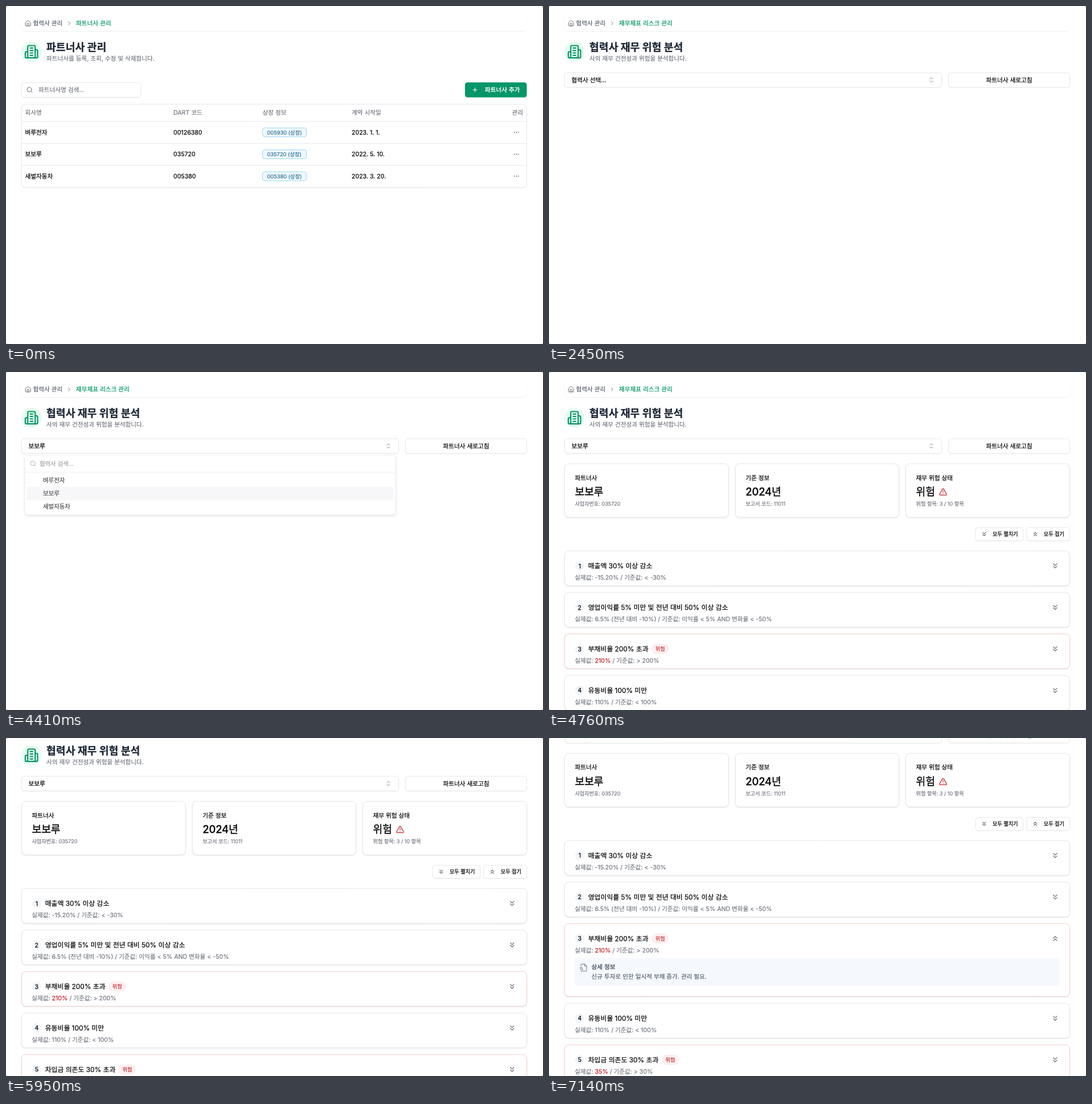
Recreate the animation shown at these times as an HTML page with a canvas. Size 943 px wide and 594 px high, loop 8.12 s.

```html
<!DOCTYPE html>
<html lang="ko">
<head>
<meta charset="utf-8">
<title>파트너사 관리</title>
<style>
html, body { margin: 0; width: 100%; height: 100%; overflow: hidden; background: #fff; }
canvas { display: block; width: 943px; height: 594px; }
</style>
</head>
<body>
<canvas id="stage"></canvas>
<script>
const W = 943, H = 594, LOOP = 8120, STEP = 70;
const canvas = document.getElementById('stage');
const ctx = canvas.getContext('2d');
const dpr = window.devicePixelRatio || 1;
canvas.width = W * dpr;
canvas.height = H * dpr;

const FAMILY = 'Inter, "Noto Sans CJK KR", "Noto Sans CJK", sans-serif';
const INK = '#0a0a0a', GRAY = '#696e77', GREEN = '#059669', RED = '#c5262b', LINE = '#e3e5e9';
const BODY = 10.6, SMALL = 9.1, HEAD = 11.85, TITLE = 18.3;

const COMPANIES = [
  { name: '벼루전자', code: '00126380', stock: '005930', since: '2023. 1. 1.' },
  { name: '보보루', code: '035720', stock: '035720', since: '2022. 5. 10.' },
  { name: '새벌자동차', code: '005380', stock: '005380', since: '2023. 3. 20.' }
];

// value is the measured part, red when the check fails
const CHECKS = [
  { title: '매출액 30% 이상 감소', value: '-15.20%', limit: '< -30%' },
  { title: '영업이익률 5% 미만 및 전년 대비 50% 이상 감소', value: '6.5% (전년 대비 -10%)', limit: '이익률 < 5% AND 변화율 < -50%' },
  { title: '부채비율 200% 초과', value: '210%', limit: '> 200%', risk: true },
  { title: '유동비율 100% 미만', value: '110%', limit: '< 100%' },
  { title: '차입금 의존도 30% 초과', value: '35%', limit: '> 30%', risk: true },
  { title: '이자보상배율 1 미만', value: '1.5', limit: '< 1' }
];

const ICONS = {
  home: ['M15 21v-8a1 1 0 0 0-1-1h-4a1 1 0 0 0-1 1v8', 'M3 10a2 2 0 0 1 .7-1.5l7-6a2 2 0 0 1 2.6 0l7 6A2 2 0 0 1 21 10v9a2 2 0 0 1-2 2H5a2 2 0 0 1-2-2z'],
  right: ['m9 18 6-6-6-6'],
  building: ['M6 22V4a2 2 0 0 1 2-2h8a2 2 0 0 1 2 2v18Z', 'M6 12H4a2 2 0 0 0-2 2v6a2 2 0 0 0 2 2h2', 'M18 9h2a2 2 0 0 1 2 2v9a2 2 0 0 1-2 2h-2', 'M10 6h4M10 10h4M10 14h4M10 18h4'],
  search: ['M19 11a8 8 0 1 1-16 0a8 8 0 1 1 16 0', 'm21 21-4.3-4.3'],
  plus: ['M5 12h14M12 5v14'],
  dots: ['M5 12h.01M12 12h.01M19 12h.01'],
  sort: ['m7 15 5 5 5-5', 'm7 9 5-5 5 5'],
  down: ['m7 6 5 5 5-5', 'm7 13 5 5 5-5'],
  up: ['m17 11-5-5-5 5', 'm17 18-5-5-5 5'],
  alert: ['m21.73 18-8-14a2 2 0 0 0-3.48 0l-8 14A2 2 0 0 0 4 21h16a2 2 0 0 0 1.73-3', 'M12 9v4M12 17h.01'],
  file: ['M14 2v4a2 2 0 0 0 2 2h4', 'M4.27 21a2 2 0 0 0 1.73 1H18a2 2 0 0 0 2-2V7l-5-5H6a2 2 0 0 0-2 2v3', 'm9 18-1.5-1.5', 'M8 14a3 3 0 1 1-6 0a3 3 0 1 1 6 0']
};
for (const key in ICONS) ICONS[key] = ICONS[key].map(d => new Path2D(d));

const ramp = (t, from, to) => Math.min(1, Math.max(0, (t - from) / (to - from)));
const easeOut = p => 1 - (1 - p) * (1 - p);

function group(alpha, dx, dy, draw) {
  if (alpha <= 0) return;
  ctx.save();
  ctx.globalAlpha *= alpha;
  ctx.translate(dx, dy);
  draw();
  ctx.restore();
}

// Text is placed by its vertical centre; returns its right edge.
function text(str, x, cy, color = INK, size = BODY, { bold = 0.14, weight = 400, align = 'left' } = {}) {
  ctx.font = `${weight} ${size}px ${FAMILY}`;
  ctx.textAlign = align;
  const y = cy + size * 0.37;
  ctx.fillStyle = ctx.strokeStyle = color;
  ctx.fillText(str, x, y);
  ctx.lineWidth = bold;
  ctx.lineJoin = 'round';
  ctx.strokeText(str, x, y);
  return x + ctx.measureText(str).width;
}
const MEDIUM = { bold: 0.25 };

function icon(name, cx, cy, size, color, weight = 2) {
  const k = size / 24;
  ctx.save();
  ctx.translate(cx - size / 2, cy - size / 2);
  ctx.scale(k, k);
  ctx.strokeStyle = color;
  ctx.lineWidth = weight;
  ctx.lineCap = ctx.lineJoin = 'round';
  for (const path of ICONS[name]) ctx.stroke(path);
  ctx.restore();
}

function box(x, y, right, bottom, r, fill, border, shadow = 0, blur = 2, drop = 1) {
  const shape = new Path2D();
  shape.roundRect(x, y, right - x, bottom - y, r);
  if (shadow) {
    // The shadow stays outside, so a fading box never shows it through its fill.
    const outside = new Path2D(shape);
    outside.rect(x - 20, y - 20, right - x + 40, bottom - y + 40);
    ctx.save();
    ctx.clip(outside, 'evenodd');
    ctx.shadowColor = `rgba(0,0,0,${shadow})`;
    ctx.shadowBlur = blur * dpr;
    ctx.shadowOffsetY = drop * dpr;
    ctx.fillStyle = '#fff';
    ctx.fill(shape);
    ctx.restore();
  }
  ctx.fillStyle = fill;
  ctx.fill(shape);
  if (border) {
    ctx.strokeStyle = border;
    ctx.lineWidth = 0.9;
    ctx.stroke(shape);
  }
}

function hline(x, right, y) {
  ctx.fillStyle = LINE;
  ctx.fillRect(x, y - 0.45, right - x, 0.9);
}

function disc(cx, cy, r, color) {
  ctx.fillStyle = color;
  ctx.beginPath();
  ctx.arc(cx, cy, r, 0, Math.PI * 2);
  ctx.fill();
}

function breadcrumb(label) {
  box(27, 17, 914.5, 44, 6, '#fff', null, 0.09, 2, 0.8);
  icon('home', 38.7, 30.5, 12, GRAY);
  text('협력사 관리', 47.5, 30.3, '#4b5563');
  icon('right', 111, 30.5, 11, GRAY);
  text(label, 123, 30.3, GREEN, BODY, MEDIUM);
}

function heading(title, sub) {
  disc(44.7, 80.2, 17.8, '#e7fbef');
  icon('building', 44.7, 80.3, 26, GREEN);
  text(title, 71, 72.7, '#1f2937', TITLE, { weight: 700, bold: 0.3 });
  text(sub, 71, 91.6, GRAY);
}

function listPage() {
  breadcrumb('파트너사 관리');
  heading('파트너사 관리', '파트너사를 등록, 조회, 수정 및 삭제합니다.');

  box(27.2, 134.6, 237, 160.4, 4.5, '#fff', LINE, 0.05);
  icon('search', 41.5, 147.4, 12, GRAY);
  text('파트너사명 검색...', 57, 147.2, GRAY);
  box(806, 134.3, 914.5, 160.6, 4.5, GREEN, null, 0.1);
  icon('plus', 823.5, 147.4, 12, '#fff');
  text('파트너사 추가', 841, 147.2, '#fff', BODY, { bold: 0.4 });

  box(27.4, 172.6, 914.4, 318.8, 6, '#fff', LINE, 0.06);
  text('회사명', 33.5, 187.4, GRAY);
  text('DART 코드', 294, 187.4, GRAY);
  text('상장 정보', 450.5, 187.4, GRAY);
  text('계약 시작일', 607, 187.4, GRAY);
  text('관리', 908, 187.4, GRAY, BODY, { align: 'right' });
  COMPANIES.forEach((c, i) => {
    const y = 221.9 + i * 38.6;
    hline(27.4, 914.4, y - 19.1);
    text(c.name, 33.5, y, INK, BODY, MEDIUM);
    text(c.code, 294, y, INK, BODY, MEDIUM);
    box(450.5, y - 7.7, 527.6, y + 7.9, 4, '#eff8fe', '#8fd3ee');
    text(`${c.stock} (상장)`, 458.5, y + 0.3, '#23688f', 9.3);
    text(c.since, 607, y, INK, BODY, MEDIUM);
    icon('dots', 896.3, y, 12, INK, 3);
  });
}

function toolbar(label, hover, busy) {
  box(27.4, 117.2, 689.6, 143, 4.5, '#fff', LINE, 0.06);
  group(hover, 0, 0, () => box(27.9, 117.7, 689.1, 142.5, 4, '#f3f4f6'));
  text(label, 39.5, 129.6, INK, BODY, MEDIUM);
  icon('sort', 671.5, 130, 12, '#858585');
  group(busy ? 0.5 : 1, 0, 0, () => {
    box(701.4, 117.2, 914.4, 143, 4.5, '#fff', LINE, 0.06);
    text('파트너사 새로고침', 808, 129.6, INK, BODY, { bold: 0.25, align: 'center' });
  });
}

function spinner(t) {
  const turn = (t - 2123) / 1000 * Math.PI * 2;
  const ring = (from, to, color) => {
    ctx.beginPath();
    ctx.arc(470.6, 224.8, 22, from, to);
    ctx.strokeStyle = color;
    ctx.lineWidth = 3;
    ctx.lineCap = 'butt';
    ctx.stroke();
  };
  ring(0, Math.PI * 2, '#f3f4f6');
  ring(turn - Math.PI * 0.75, turn - Math.PI * 0.25, GREEN);
  text('데이터를 불러오는 중입니다...', 470.6, 268.5, '#4b5563', 12.1, { bold: 0.2, align: 'center' });
}

function dropdown(open, picked, caret) {
  const scale = 0.95 + 0.05 * open;
  group(open, 358.5, 146.5, () => {
    ctx.scale(scale, scale);
    ctx.translate(-358.5, -146.5);
    box(27.4, 146.6, 689.6, 252.8, 4.5, '#fff', LINE, 0.16, 5, 2.2);
    icon('search', 42.3, 161.3, 12, '#8b8b8b');
    text('협력사 검색...', 53.8, 161, '#737373');
    if (caret) {
      ctx.fillStyle = INK;
      ctx.fillRect(53.8, 156, 0.9, 10.5);
    }
    hline(27.4, 689.6, 176.6);
    const top = 179.4 + picked * 23.5;
    box(30.6, top, 686.4, top + 23.6, 3, '#f3f4f6');
    COMPANIES.forEach((c, i) => text(c.name, 60, 190.8 + i * 23.4, INK, BODY, MEDIUM));
  });
}

function summary(x, right, label, value, note) {
  box(x, 161.2, right, 255.3, 7.5, '#fff', LINE, 0.15, 2.5, 1);
  text(label, x + 18, 185.6, INK, BODY, MEDIUM);
  text(value, x + 18, 210.7, INK, 18.2, { weight: 500, bold: 0.35 });
  text(note, x + 18, 231.4, GRAY, SMALL);
}

function smallButton(x, right, name, label) {
  box(x, 273.6, right, 296.6, 4.5, '#fff', LINE, 0.06);
  icon(name, x + 15.2, 285, 12, INK);
  text(label, x + 30, 284.8, INK, SMALL, MEDIUM);
}

function check(item, n, y, open) {
  box(27.4, y, 914.4, y + (open ? 128.2 : 61), 7.5, '#fff', item.risk ? '#f5c8c8' : LINE, 0.15, 2.5, 1);
  disc(53.8, y + 26.3, 8.2, '#f1f5f9');
  text(n, 53.8, y + 26.3, INK, BODY, { bold: 0.25, align: 'center' });
  const end = text(item.title, 68.7, y + 26.2, INK, HEAD, MEDIUM);
  if (item.risk) {
    box(end + 6.3, y + 18.5, end + 35, y + 34.2, 7.8, '#fef2f2', '#fbdcdc');
    text('위험', end + 20.6, y + 26.4, RED, SMALL, { bold: 0.2, align: 'center' });
  }
  icon(open ? 'up' : 'down', 888.8, y + 26.3, 14.9, GRAY);

  let x = text('실제값: ', 45.3, y + 46.6, GRAY);
  x = text(item.value, x, y + 46.6, item.risk ? RED : GRAY, BODY, item.risk ? MEDIUM : {});
  text(` / 기준값: ${item.limit}`, x, y + 46.6, GRAY);

  if (open) {
    box(45.3, y + 60.4, 896.3, y + 109.2, 4.5, '#f5f8fc');
    icon('file', 61, y + 77.4, 14.9, '#8a929e');
    text('상세 정보', 74.5, y + 75.9, '#374151', BODY, MEDIUM);
    text('신규 투자로 인한 일시적 부채 증가. 관리 필요.', 74.5, y + 93.4, '#475569');
  }
}

function report(expanded) {
  const c = COMPANIES[1];
  summary(27.4, 315.2, '파트너사', c.name, `사업자번호: ${c.code}`);
  summary(327.2, 614.6, '기준 정보', '2024년', '보고서 코드: 11011');
  summary(626.6, 914.4, '재무 위험 상태', '위험', '위험 항목: 3 / 10 항목');
  icon('alert', 692, 210.8, 14.9, RED);
  smallButton(749, 832.8, 'down', '모두 펼치기');
  smallButton(838.8, 914.4, 'up', '모두 접기');
  CHECKS.forEach((item, i) => {
    const push = expanded && i > 2 ? 67.2 : 0;
    check(item, i + 1, 314.4 + i * 72.95 + push, expanded && i === 2);
  });
}

function scrollAt(t) {
  if (t < 5880) return 0;
  const stops = [10.3, 50, 98, 127.7, 134.2];
  return stops[Math.min(4, Math.floor((t - 5880) / STEP))];
}

function riskPage(t) {
  const loading = t < 2450, chosen = t >= 4410;
  ctx.translate(0, -scrollAt(t));
  breadcrumb('재무제표 리스크 관리');
  const enter = easeOut(ramp(t, 2120, 2420));
  group(enter, 0, -7.4 * (1 - enter), () =>
    heading('협력사 재무 위험 분석', '사의 재무 건전성과 위험을 분석합니다.'));

  const hover = ramp(t, 3040, 3150) - ramp(t, 3680, 3790);
  toolbar(chosen ? COMPANIES[1].name : '협력사 선택...', hover, loading);
  if (loading) spinner(t);

  const show = easeOut(ramp(t, 4440, 4740));
  group(show, 0, 7.4 * (1 - show), () => report(t >= 7140));

  const open = easeOut(ramp(t, 3260, 3410)) - ramp(t, 4360, 4510);
  dropdown(open, t < 3850 ? 0 : 1, t < 3850);
}

function corners() {
  ctx.beginPath();
  ctx.rect(0, 0, W, H);
  ctx.roundRect(0, 0, W, H, 2.5);
  ctx.fillStyle = '#777';
  ctx.fill('evenodd');
}

function draw(ms) {
  const t = Math.floor((ms % LOOP) / STEP) * STEP;
  ctx.setTransform(dpr, 0, 0, dpr, 0, 0);
  ctx.fillStyle = '#fff';
  ctx.fillRect(0, 0, W, H);
  ctx.save();
  if (t < 2170) listPage(); else riskPage(t);
  ctx.restore();
  corners();
}

const start = performance.now();
function tick() {
  draw(performance.now() - start);
  requestAnimationFrame(tick);
}
tick();
</script>
</body>
</html>
```
